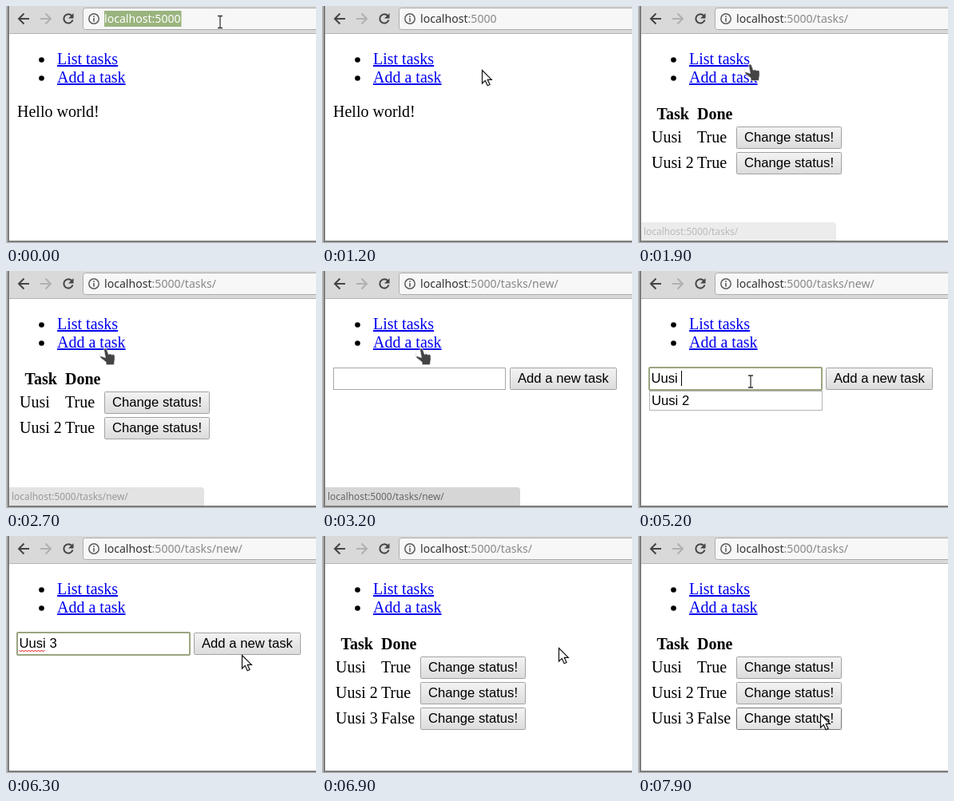
An HTML page that plays this animation: 388 px wide and 297 px high, repeating every 8000 ms.

```html
<!DOCTYPE html>
<html lang="en">
<head>
<meta charset="utf-8">
<title>Task list demo</title>
<style>
  html, body { margin: 0; width: 100%; height: 100%; overflow: hidden; background: #fff; }
  svg { display: block; width: 388px; height: 297px; }
  text { white-space: pre; font: 20px "Liberation Serif", serif; }
  .bold { font-weight: bold; }
  .link { fill: #00e; text-decoration: underline; }
  .ui { font: 16.67px "Liberation Sans", sans-serif; }
  .url { font: 14.1px "Noto Sans", sans-serif; fill: #333; }
  .dim { fill: #888; }
  .icon { fill: none; stroke: #444; stroke-width: 2; }
  .btn rect { fill: url(#face); stroke: #a2a2a2; }
  .btn.hover rect { fill: url(#lit); stroke: #777; }
  .btn.down rect { fill: #dadada; stroke: #777; }
</style>
</head>
<body>
<svg viewBox="0 0 388 297">
  <defs>
    <linearGradient id="face" x2="0" y2="1"><stop stop-color="#f3f3f3"/><stop offset="1" stop-color="#dcdcdc"/></linearGradient>
    <linearGradient id="lit" x2="0" y2="1"><stop stop-color="#f8f8f8"/><stop offset="1" stop-color="#e2e2e2"/></linearGradient>
  </defs>
  <rect width="388" height="297" fill="#fff"/>

  <g id="toolbar">
    <rect width="388" height="34" fill="#d9d9d9"/>
    <rect y="34" width="388" height="1" fill="#b4b4b4"/>
    <path class="icon" d="M29 16H16.500M22.500 9.500L16 16l6.500 6.500"/>
    <path class="icon" style="stroke:#b0b0b0" d="M43 16H55.500M49.500 9.500L56 16l-6.500 6.500"/>
    <path class="icon" d="M82.400 12.200A5.700 5.700 0 1 0 83.500 17.500"/>
    <path d="M84.500 9v6.500H78z" fill="#444"/>
    <rect x="96.500" y="2.500" width="300" height="27" rx="3" fill="#f7f7f7" stroke="#ababab"/>
    <circle cx="110" cy="16" r="6.200" fill="none" stroke="#5c5c5c" stroke-width="1.500"/>
    <path d="M110 12.200v1.700M110 15v4.800" stroke="#5c5c5c" stroke-width="1.600"/>
    <rect id="selection" x="123" y="6" width="96.500" height="20" fill="#9ab47e"/>
    <text class="url" id="url" x="123" y="21"><tspan>localhost</tspan><tspan class="dim" id="path"></tspan></text>
  </g>

  <g id="menu">
    <circle cx="44.500" cy="67.500" r="3.300"/>
    <circle cx="44.500" cy="90.500" r="3.300"/>
    <text class="link" x="64" y="73">List tasks</text>
    <text class="link" x="64" y="96">Add a task</text>
  </g>

  <g id="home"><text x="14" y="139">Hello world!</text></g>

  <g id="list">
    <text class="bold" x="43.700" y="142" text-anchor="middle">Task</text>
    <text class="bold" x="74" y="142">Done</text>
  </g>

  <g id="form">
    <rect id="field" x="14.500" y="121.500" width="215" height="27" fill="#fff" stroke="#a6a6a6"/>
    <rect id="ring" x="14" y="121" width="216" height="28" rx="1" fill="none" stroke="#9aa57f" stroke-width="2"/>
    <text class="ui" id="typed" x="16.500" y="140"></text>
    <path id="squiggle" fill="none" stroke="#e00000"/>
    <rect id="caret" y="125" width="1" height="19"/>
    <g id="hint">
      <rect x="14.500" y="150.500" width="216" height="24" fill="#fff" stroke="#b5b5b5"/>
      <text class="ui" x="17" y="168">Uusi 2</text>
    </g>
  </g>

  <g id="status">
    <path d="M3 271H244q4 0 4 4V295H3z" fill="#d6d6d6"/>
    <text class="url" style="font-size:11.900px;fill:#666" id="target" x="7" y="287"></text>
  </g>

  <path d="M0 0H2V297H0zM0 296H388V297H0z" fill="#b6b6b6"/>
  <path d="M2 0H4V294H388V296H2z" fill="#7c7c7c"/>

  <g id="cursor">
    <path id="arrow" d="M.500 .500V17l3.800-3.600 2.900 6.400 2.900-1.300-2.900-6.200h5.100z" fill="#fff" stroke="#111" stroke-width="1.200"/>
    <path id="hand" d="M0 1Q1.800-1 3.500 1L5.800 7.500 8 6.800 10 8l2-.500 1.500 1.300Q14 14 13 17.500L12.700 20.500H3L2.500 17-4.500 11.500Q-5-.500-5 10.500-3.500 8.800-1.500 10.500L2 11.500z" fill="#444" stroke="#eee" stroke-width=".600"/>
    <g id="beam" fill="none">
      <path d="M-3-7.500H3M0-7.500V7.500M-3 7.500H3" stroke="#fff" stroke-width="3"/>
      <path d="M-3-7.500H3M0-7.500V7.500M-3 7.500H3" stroke="#333" stroke-width="1.300"/>
    </g>
  </g>
</svg>
<script>
const LOOP = 8000, STEP = 100;
const $ = id => document.getElementById(id);
const show = (id, on) => { $(id).style.display = on ? '' : 'none'; };
const during = (t, from, to) => t >= from && t < to;

// [time, x, y]
const mouse = [
  [900, 268, 20], [1000, 296, 34], [1200, 200, 80], [1500, 138.500, 73],
  [2200, 138.500, 73], [2600, 122.500, 97],
  [3200, 122.500, 97], [3500, 134, 116], [3900, 141, 138.500],
  [5900, 141, 138.500], [6100, 205, 76], [6300, 295, 149], [6600, 296, 140],
  [7000, 296, 140], [7200, 298, 136],
  [7300, 298, 136], [7500, 285, 98], [7700, 245, 162], [7900, 228, 223]
];
// [time, opacity]
const bubble = [
  [1500, 0], [1800, 1], [1900, .45], [2000, 0],
  [2500, 0], [2800, 1], [3200, 1], [3500, 0]
];

function sample(track, t) {
  const i = track.findIndex(k => k[0] > t);
  if (i < 0) return track[track.length - 1].slice(1);
  if (i === 0) return track[0].slice(1);
  const a = track[i - 1], b = track[i], p = (t - a[0]) / (b[0] - a[0]);
  return a.slice(1).map((v, n) => v + (b[n + 1] - v) * p);
}

function add(parent, tag, attrs, text = '') {
  const el = document.createElementNS('http://www.w3.org/2000/svg', tag);
  for (const k in attrs) el.setAttribute(k, attrs[k]);
  el.textContent = text;
  return parent.appendChild(el);
}

const buttons = [];
function addButton(parent, page, x, y, w, label) {
  const el = add(parent, 'g', { class: 'btn' });
  add(el, 'rect', { x: x + .5, y: y + .5, width: w - 1, height: 27, rx: 1 });
  add(el, 'text', { class: 'ui', x: x + 10, y: y + 19 }, label);
  buttons.push({ el, page, box: [x, y, x + w, y + 28] });
}

[['Uusi', 'True'], ['Uusi 2', 'True'], ['Uusi 3', 'False']].forEach(([name, done], i) => {
  const row = add($('list'), 'g', { id: 'row' + i }), y = 151 + 32 * i;
  add(row, 'text', { x: 17, y: y + 20 }, name);
  add(row, 'text', { x: 74, y: y + 20 }, done);
  addButton(row, 'list', 123, y, 132, 'Change status!');
});
addButton($('form'), 'form', 235, 121, 134, 'Add a new task');

let wave = 'M16.500 143';
for (let x = 0; x < 16; x++) wave += `l2 ${x % 2 ? -2 : 2}`;
$('squiggle').setAttribute('d', wave);

const paths = { home: ':5000', list: ':5000/tasks/', form: ':5000/tasks/new/' };
const pageAt = t => t < 1900 ? 'home' : t < 3100 ? 'list' : t < 6900 ? 'form' : 'list';

function draw(t) {
  const page = pageAt(t);
  for (const p in paths) show(p, p === page);
  show('row2', t >= 6900);

  const selected = t < 400;
  show('selection', selected);
  $('url').style.fill = selected ? '#fff' : '';
  $('path').style.fill = selected ? '#fff' : '';
  $('path').textContent = paths[page];

  const [x, y] = sample(mouse, t);
  const over = ([l, top, r, b]) => x >= l && x < r && y >= top && y < b;
  const onLink = over([64, 55, 140, 78]) || over([64, 78, 150, 101]);
  const onText = over([96, 2, 388, 30]) || page === 'form' && over([14, 121, 230, 149]);
  const shape = onLink ? 'hand' : onText ? 'beam' : 'arrow';
  for (const s of ['arrow', 'hand', 'beam']) show(s, s === shape);
  $('cursor').setAttribute('transform', `translate(${x} ${y})`);

  for (const b of buttons) {
    const hover = b.page === page && over(b.box);
    b.el.classList.toggle('hover', hover);
    b.el.classList.toggle('down', hover && during(t, 6800, 6900));
  }

  $('status').style.opacity = sample(bubble, t)[0];
  $('target').textContent = 'localhost' + paths[t < 2100 ? 'list' : 'form'];

  const count = Math.max(0, Math.min(6, Math.ceil((t - 4690) / 120)));
  $('typed').textContent = 'Uusi 3'.slice(0, count);
  show('ring', during(t, 4100, 6800));
  show('hint', during(t, 4800, 5300));
  show('squiggle', t >= 5400);
  show('caret', during(t, 4200, 5900) || during(t, 6400, 6800));
  if (page === 'form') {
    $('caret').setAttribute('x', Math.round(16.5 + $('typed').getComputedTextLength()));
  }
}

function tick() {
  const t = performance.now() % LOOP;
  draw(Math.floor(t / STEP) * STEP);
  requestAnimationFrame(tick);
}
tick();
</script>
</body>
</html>
```
